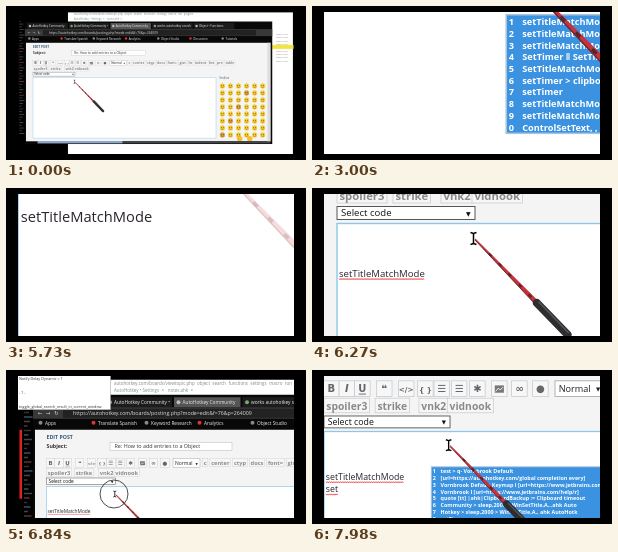
An HTML page with a canvas that plays this animation: 300 by 154 pixels, repeating every 8000 ms.

```html
<!DOCTYPE html>
<html lang="en">
<head>
<meta charset="utf-8">
<title>Typing with a completion list</title>
<style>
html, body { margin: 0; width: 100%; height: 100%; overflow: hidden; background: #000; }
canvas { display: block; width: 300px; height: 154px; }
</style>
</head>
<body>
<canvas id="stage"></canvas>
<script>
const LOOP = 8000;
const canvas = document.getElementById('stage');
const ctx = canvas.getContext('2d');
const dpr = window.devicePixelRatio || 1;
canvas.width = 300 * dpr;
canvas.height = 154 * dpr;

const SANS = '"Open Sans", sans-serif';
const SYMBOL = '"DejaVu Sans", sans-serif';

// Camera: time, scale, x offset, y offset
const CAMERA = [
  [0, .304, 19.4, 60.5], [30, .304, 19.4, 60.5], [150, 1.56, -28, -107],
  [5700, 1.56, -28, -107], [6270, 1, 0, 0], [6840, .5, 28, 98.75],
  [7230, .457, 25.6, 90.8], [7320, .457, 25.6, 90.8],
  [7800, .913, -10.8, 29.1], [8000, .913, -10.8, 29.1]
];
const FIRST_LINE = [
  [0, ''], [1140, 's'], [1260, 'se'], [1520, 'set'], [1640, 'sett'], [1760, 'settt'],
  [2660, 'sett'], [2690, 'set'], [2720, 's'], [2750, ''],
  [3670, 's'], [3700, 'se'], [3730, 'set'], [4260, 'sett'], [4650, 'setTitleMatchMode']
];
const SECOND_LINE = [[0, ''], [7680, 's'], [7740, 'se'], [7800, 'set']];
const CARET = [[0, true], [680, false], [1140, true], [2200, false], [2230, true], [2660, false]];

const MODE = 'setTitleMatchMode';
const COMMANDS = [MODE, MODE, MODE, 'SetTimer ‖ SetTimer', 'SetTitleMatchMode',
  'setTimer > clipboard', 'setTimer', MODE, MODE, 'ControlSetText, , text'];
const SNIPPETS = ['test > q- Vornbrook Default',
  '[url=https://autohotkey.com/global completion every]',
  'Vornbrook Default Keymap I [url=https://www.jetbrains.com',
  'Vornbrook I [url=https://www.jetbrains.com/help/r]',
  'quote [tt] |ahk|ClipboardBackup := Clipboard timeout',
  'Community > sleep,2000 > WinSetTitle,A,..ahk Auto',
  'Hotkey > sleep,2000 > WinSetTitle,A,, ahk AutoHotk',
  'setTimer', MODE, MODE];

const ramp = (t, from, to) => Math.min(1, Math.max(0, (t - from) / (to - from)));
const latest = (keys, t) => keys.filter(key => key[0] <= t).pop()[1];

function cameraAt(t) {
  const i = CAMERA.findIndex(key => key[0] > t);
  const a = CAMERA[i - 1], b = CAMERA[i];
  const k = ramp(t, a[0], b[0]);
  return [1, 2, 3].map(n => a[n] + (b[n] - a[n]) * k);
}

function rect(x, y, w, h, fill, stroke, line = 1) {
  if (fill) { ctx.fillStyle = fill; ctx.fillRect(x, y, w, h); }
  if (stroke) { ctx.strokeStyle = stroke; ctx.lineWidth = line; ctx.strokeRect(x, y, w, h); }
}

function text(str, x, y, size, color, weight = '', family = SANS) {
  ctx.font = `${weight} ${size}px ${family}`;
  ctx.fillStyle = color;
  ctx.fillText(str, x, y);
  return ctx.measureText(str).width;
}

function line(points, color, width) {
  ctx.beginPath();
  points.forEach(([x, y]) => ctx.lineTo(x, y));
  ctx.strokeStyle = color;
  ctx.lineWidth = width;
  ctx.stroke();
}

function disc(x, y, r, color) {
  ctx.beginPath();
  ctx.arc(x, y, r, 0, 7);
  ctx.fillStyle = color;
  ctx.fill();
}

function drawDesktop() {
  rect(140, -178, 740, 466, '#fff');
  text('autohotkey.com/boards/viewtopic.php  object  search  functions  settings  macro  run  plugins', 160, -168, 9, '#888');
  text('AutoHotkey • Settings  ×   notes.ahk  ×', 160, -154, 9, '#798');
  for (let i = 0; i < 9; i++) {
    text('item ' + (i + 1) + ' list', 826, -104 + i * 11, 8, '#777');
  }
  rect(812, -71, 70, 13, '#f4e53c');
  for (let i = 0; i < 42; i++) {
    rect(-20, -150 + i * 9, 6 + i * 7 % 12, 3, ['#333', '#35506a', '#444', '#573338'][i % 4]);
  }
  rect(-29, -78, 5, 138, '#d22');
}

function drawBrowserChrome() {
  rect(-2, -148, 814, 403, '#080808');
  ['AutoHotkey Community', 'AutoHotkey Community •', 'AutoHotkey Community', 'works autohotkey search', 'Object • Functions']
    .forEach((title, i) => {
      const x = 6 + i * 137;
      rect(x, -143, 133, 20, i === 2 ? '#555' : '#1c1c1c');
      disc(x + 9, -133, 4, i % 2 ? '#7aa86c' : '#bbb');
      text(title, x + 17, -129, 9.5, '#eee');
    });
  rect(-2, -123, 814, 23, '#383838');
  rect(58, -120, 700, 18, '#222');
  text('←  →  ↻', 8, -107, 11, '#ddd', '', SYMBOL);
  text('https://autohotkey.com/boards/posting.php?mode=edit&f=76&p=264009', 78, -107, 10.5, '#ddd');
  ['Apps', 'Translate Spanish', 'Keyword Research', 'Analytics', 'Object Studio', 'Discussion', 'Tutorials']
    .forEach((title, i) => {
      const x = 8 + i * 106;
      disc(x + 5, -92, 4, i % 2 ? '#d33' : '#888');
      text(title, x + 14, -88.5, 9.5, '#eee');
    });
}

function drawToolbar() {
  const icons = ['B', 'I', 'U', '❝', '</>', '{ }', '☰', '☰', '✱', 'picture', '∞', '●'];
  const centers = [33, 50, 67, 91, 115, 136, 154, 173, 193, 217, 239, 262];
  icons.forEach((icon, i) => {
    const x = centers[i];
    rect(x - 8.5, -20, 17, 17, '#f7f7f7', '#c4c8cc', .8);
    if (icon === 'picture') {
      rect(x - 5, -15, 10, 8, '#777');
      line([[x - 4, -8.5], [x - 1, -12], [x + 1, -10], [x + 4, -13]], '#fff', 1);
      return;
    }
    ctx.textAlign = 'center';
    text(icon, x, -7.5, icon.length > 1 ? 8 : 11, '#666', i === 1 ? 'italic bold' : 'bold', SYMBOL);
    if (i === 2) line([[x - 4, -5.5], [x + 4, -5.5]], '#666', 1);
    ctx.textAlign = 'left';
  });
  rect(278, -20, 54, 17, '#fff', '#999', .8);
  text('Normal', 282, -8, 10, '#222');
  text('▼', 323, -8.5, 6, '#222', '', SYMBOL);
  let x = 337;
  ['c', 'center', 'ctyp', 'docs', 'font=', 'gist', 'hr', 'indent', 'list', 'pre', 'table']
    .forEach(tag => { x += drawTag(tag, x, -7.5); });
}

function drawTag(label, x, y) {
  ctx.font = `bold 11.3px ${SANS}`;
  const w = ctx.measureText(label).width + 5;
  rect(x, y - 12.5, w, 16, '#f6f6f6', '#c8ccd0', .8);
  text(label, x + 2.5, y, 11.3, '#8a8a8a', 'bold');
  return w + 4;
}

function drawSmileys() {
  for (let i = 0; i < 48; i++) {
    const x = 648 + i % 6 * 26.5, y = 64 + Math.floor(i / 6) * 23;
    const odd = i * 37 % 11 === 3;
    disc(x, y, 8.5, odd ? '#d9a03a' : '#f6cf35');
    disc(x - 3, y - 2, 1.6, '#432');
    disc(x + 3, y - 2, 1.6, '#432');
    line([[x - 4, y + 3], [x, y + 5], [x + 4, y + 3]], i % 5 ? '#843' : '#d22', 1.8);
  }
  disc(705, 238, 9, '#f0c030');
  disc(738, 238, 9, '#f0c030');
}

function drawPage() {
  rect(2, -78, 804, 324, '#f4f4f4');
  text('EDIT POST', 25, -60, 10.5, '#345a78', 'bold');
  text('Subject:', 25, -41, 10.5, '#333', 'bold');
  rect(152, -53, 244, 16, '#fff', '#b4bac0');
  text('Re: How to add entries to a Object', 161, -41, 10.8, '#333');
  drawToolbar();
  [['spoiler3', 25], ['strike', 81], ['vnk2', 129], ['vidnook', 160]]
    .forEach(([label, x]) => drawTag(label, x, 11.5));
  rect(25, 18.5, 138, 13, '#fff', '#555');
  text('Select code', 29, 28.3, 9.6, '#111');
  text('▼', 154, 27.5, 6, '#111', '', SYMBOL);
  rect(25, 35.5, 602, 200, '#fff', '#8cc8ec', 1.4);
  text('Smilies', 638, 42, 10, '#555');
  drawSmileys();
  rect(40, 245, 280, 8, '#8ea6c8');
  rect(320, 245, 486, 8, '#444');
  rect(796, -78, 10, 324, '#ddd');
}

function squiggle(x, y, w) {
  const points = [];
  for (let i = 0; i <= w; i++) points.push([x + i, y + (i % 2 ? .7 : -.7)]);
  line(points, '#e33', .8);
}

function drawTyped(t) {
  const lines = [latest(FIRST_LINE, t), latest(SECOND_LINE, t)];
  lines.forEach((str, i) => {
    const y = 88.5 + i * 13.4;
    const w = text(str, 27, y, 9.6, '#2b2430');
    if (t > 5730 && str) squiggle(27, y + 2.6, w);
    if (i === 0 && t >= 120 && latest(CARET, t)) rect(27 + w - .3, y - 9.2, .9, 11.4, '#222');
  });
}

function drawPopup(t) {
  const second = t > 7000;
  const start = second ? 7710 : 1700;
  const reload = t >= 3670 && t < 3730 ? .5 : 1;
  const alpha = second ? ramp(t, start, 7800) : ramp(t, start, 1790) * (1 - ramp(t, 4740, 5330));
  if (!alpha) return;
  const slide = second ? 0 : 7.7 * (ramp(t, 1820, 1970) - 1);
  const top = 73.7 + slide, left = 142;
  const width = 270, height = 77;
  ctx.save();
  ctx.globalAlpha = alpha;
  rect(left, top, width, height, '#f1f1f1');
  ctx.globalAlpha = alpha * reload * (second ? ramp(t, 7780, 7950) : ramp(t, 1830, 1970));
  rect(left + .5, top + .5, width - 1, height - 1, '#3a92e0', '#a9c3d8', 1);
  (second ? SNIPPETS : COMMANDS).forEach((row, i) => {
    const y = top + 7.2 + i * 7.5;
    text((i + 1) % 10, left + 2, y, 5.9, '#fff', 'bold');
    text(row, left + 10.7, y, 5.9, '#fff', 'bold');
  });
  ctx.restore();
}

function stickAlpha(t) {
  if (t < 150) return 1 - ramp(t, 30, 150);
  if (t < 5500) return ramp(t, 1740, 1970) * (1 - ramp(t, 4740, 5330));
  return ramp(t, 5700, 5880);
}

function drawStick(t, scale) {
  ctx.save();
  ctx.globalAlpha = stickAlpha(t);
  const sway = Math.sin(ramp(t, 2880, 3240) * Math.PI) * 1.5;
  ctx.translate(163 - 8 * ramp(scale, 1, 1.56) - sway, 51);
  ctx.rotate(Math.atan2(63, 61));
  ctx.beginPath();
  [[0, -.6], [88, -2.3], [88, 2.3], [0, .6]].forEach(([x, y]) => ctx.lineTo(x, y));
  ctx.fillStyle = '#c8323a';
  ctx.fill();
  line([[0, .7], [88, 2]], '#6e2228', .9);
  [20, 34, 48, 63, 77].forEach(x => rect(x, -1, 4, 2, '#55252a'));
  ctx.lineCap = 'round';
  line([[89, 0], [133, 0]], '#2e2e30', 8);
  line([[90, -2], [132, -2]], '#56565a', 1.6);
  ctx.restore();
}

function drawCursor(t) {
  const beam = (color, width) => {
    line([[158.5, 44.5], [161.5, 45.5], [164.5, 44.5]], color, width);
    line([[161.5, 45], [161.5, 56]], color, width);
    line([[158.5, 56.5], [161.5, 55.5], [164.5, 56.5]], color, width);
  };
  beam('#fff', 3);
  beam('#000', 1.5);
  if (t >= 6690 && t < 6990) {
    ctx.beginPath();
    ctx.arc(160, 50.5, 20 + 16 * ramp(t, 6690, 6990), 0, 7);
    ctx.strokeStyle = '#222';
    ctx.lineWidth = 1.6;
    ctx.stroke();
  }
}

function drawNote(t) {
  if (t < 5700) return;
  rect(-60, -200, 213, 82, '#fff', '#999');
  text('Notify Delay Dynamic = 1', -30, -177, 7.5, '#333');
  text('- 1 -', -30, -149, 7.5, '#333');
  text('toggle_global_search_result_in_current_window', -30, -122, 7.5, '#333');
}

function draw(t) {
  const [scale, x, y] = cameraAt(t);
  ctx.setTransform(dpr, 0, 0, dpr, 0, 0);
  rect(0, 0, 300, 154, '#000');
  ctx.save();
  ctx.beginPath();
  ctx.rect(12, 6, 276, 142);
  ctx.clip();
  ctx.translate(x, y);
  ctx.scale(scale, scale);
  drawDesktop();
  drawBrowserChrome();
  drawPage();
  drawTyped(t);
  drawPopup(t);
  drawStick(t, scale);
  drawCursor(t);
  drawNote(t);
  ctx.restore();
}

const begin = performance.now();
function tick() {
  const t = (performance.now() - begin) % LOOP;
  draw(Math.floor(t / 10) * 10);
  requestAnimationFrame(tick);
}
tick();
</script>
</body>
</html>
```
